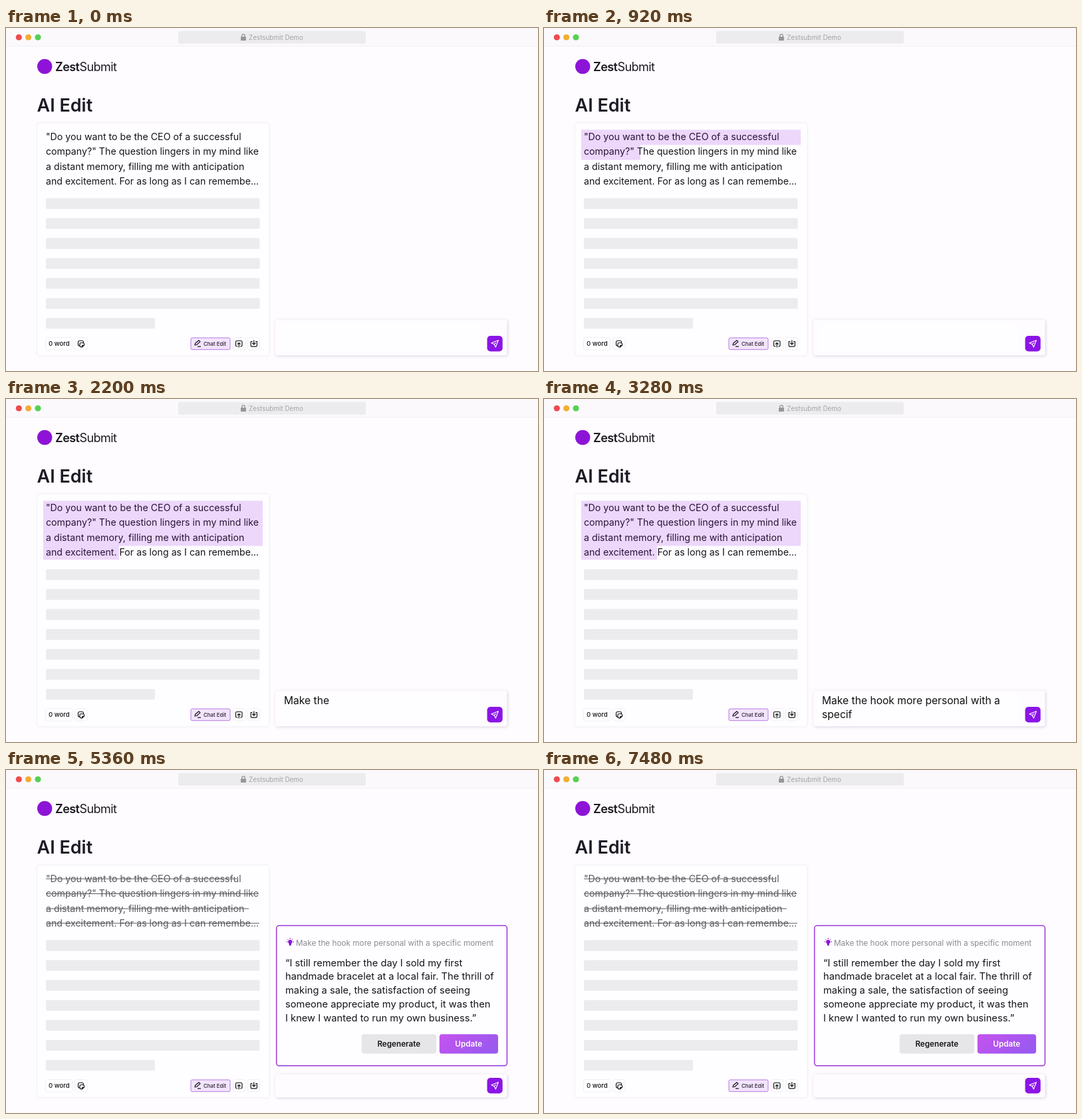
An HTML page that plays this animation: 800x517 px, repeating every 7.52 s.

```html
<!DOCTYPE html>
<html lang="en">
<head>
<meta charset="utf-8">
<title>AI Edit</title>
<style>
  html, body { margin: 0; width: 100%; height: 100%; overflow: hidden; background: #fefcff; }
  svg { display: block; width: 100vw; height: 100vh; font-family: Inter, "Open Sans", sans-serif; }
  :root { --loop: 7520ms; }

  .essay { font-size: 14.2px; fill: #161418; }
  .struck { fill: #5a585c; }
  .strike { stroke: #5a585c; stroke-width: 1; }
  .prompt { font-size: 15.6px; fill: #111; }
  .answer { font-size: 14.7px; fill: #161418; }
  .button { font-size: 11.7px; font-weight: 600; text-anchor: middle; }
  .pill { fill: #fff; stroke: #f1eef4; }
  .icon { fill: none; stroke: #161418; stroke-width: 1.2; stroke-linecap: round; stroke-linejoin: round; }
  .soft { filter: drop-shadow(0 0 1.5px rgba(70, 40, 100, .13)); }
  .raised { filter: drop-shadow(1px 1px 2px rgba(70, 40, 100, .2)); }

  .before { animation: leave var(--loop) linear infinite; }
  .after { opacity: 0; animation: enter var(--loop) linear infinite; }
  .sweep rect {
    fill: rgba(150, 20, 230, .16);
    transform: scaleX(0);
    transform-box: fill-box;
    transform-origin: left;
    animation: sweep var(--loop) linear infinite;
  }
  .sweep .last { animation-name: sweep-last; }
  .prompt .char { visibility: hidden; animation: type var(--loop) step-end infinite; }

  @keyframes leave { 0%, 51.6% { opacity: 1; } 54.8%, 100% { opacity: 0; } }
  @keyframes enter { 0%, 51.6% { opacity: 0; } 54.8%, 100% { opacity: 1; } }
  @keyframes sweep {
    0% { transform: scaleX(0); }
    4.39%, 50% { transform: scaleX(1); }
    50.01%, 100% { transform: scaleX(0); }
  }
  @keyframes sweep-last {
    0% { transform: scaleX(0); }
    1.52%, 50% { transform: scaleX(1); }
    50.01%, 100% { transform: scaleX(0); }
  }
  @keyframes type { 0% { visibility: visible; } 50%, 100% { visibility: hidden; } }
</style>
</head>
<body>
<svg viewBox="0 0 800 517" preserveAspectRatio="none">
  <defs>
    <linearGradient id="update" x1="0" y1="0" x2="1" y2=".4">
      <stop offset="0" stop-color="#c653ee"/>
      <stop offset="1" stop-color="#9b59ef"/>
    </linearGradient>
  </defs>
  <rect width="800" height="517" fill="#fefcff"/>

  <!-- window bar -->
  <rect width="800" height="27.5" fill="#fbf9fc"/>
  <path d="M0 27.5H800" stroke="#f3f0f5"/>
  <circle cx="19.3" cy="14" r="4.6" fill="#ee4b50"/>
  <circle cx="33.6" cy="14" r="4.6" fill="#f3ad35"/>
  <circle cx="48" cy="14" r="4.6" fill="#57d053"/>
  <rect x="259" y="4.5" width="282" height="19" rx="2.5" fill="#ecebee"/>
  <rect x="353" y="13" width="8" height="6" rx="1" fill="#98969b"/>
  <path d="M354.8 13V11.5a2.2 2.2 0 0 1 4.4 0V13" fill="none" stroke="#98969b" stroke-width="1.3"/>
  <text x="365" y="17.5" font-size="9.9" fill="#a5a3a8">Zestsubmit Demo</text>

  <!-- heading -->
  <circle cx="58.2" cy="58" r="11.2" fill="#8d14d6"/>
  <text x="74" y="65" font-size="18" letter-spacing="-.55" fill="#1b1920"><tspan font-weight="600">Zest</tspan><tspan>Submit</tspan></text>
  <text x="46.5" y="125.5" font-size="27" font-weight="600" fill="#1c1a24">AI Edit</text>

  <!-- essay card -->
  <rect class="soft" x="47" y="143.5" width="348.5" height="350" rx="4" fill="#fefdff"/>
  <g id="bars" fill="#ecebee"></g>
  <g class="before">
    <g id="essay" class="essay"></g>
    <g class="sweep">
      <rect x="56" y="153.3" width="330" height="22.9" style="animation-delay:502ms"/>
      <rect x="56" y="176.2" width="330" height="22.6" style="animation-delay:832ms"/>
      <rect x="56" y="198.8" width="330" height="22.6" style="animation-delay:1162ms"/>
      <rect class="last" x="56" y="221.4" width="114" height="20.8" style="animation-delay:1492ms"/>
    </g>
  </g>
  <g class="after">
    <g id="struck" class="essay struck"></g>
    <path class="strike" d="M60 164H347M60 186.5H380M60 209H365M60 231H381"/>
  </g>

  <!-- card tools -->
  <rect class="pill" x="59.5" y="466.5" width="40" height="18.5" rx="3"/>
  <text x="64" y="479.4" font-size="9.6" font-weight="500" fill="#161418">0 word</text>
  <rect class="pill" x="103.5" y="466.5" width="18.5" height="18.5" rx="3"/>
  <path class="icon" d="M110.5 471.5H114.5a2 2 0 0 1 2 2V474M110.5 471.5a2 2 0 0 0-2 2V477a2 2 0 0 0 2 2M113 474.5H115.5a2 2 0 0 1 2 2V478l-2.8 2.8H113a2 2 0 0 1-2-2V476.500a2 2 0 0 1 2-2ZM114.500 480.500V478.500H117.500"/>
  <rect x="278" y="467" width="59" height="17.7" rx="2" fill="#f3e4fd" stroke="#b57be0"/>
  <path class="icon" d="M284 478l.7-2.800 5.300-4.400 2 2.100-5.300 4.600ZM288.500 480.200H292.500"/>
  <text x="297" y="478.8" font-size="7.9" font-weight="500" fill="#2a2030">Chat Edit</text>
  <rect class="pill" x="341.500" y="466.500" width="18.500" height="18.500" rx="3"/>
  <path class="icon" d="M348 480H347a1.500 1.500 0 0 1-1.500-1.500V473a1.500 1.500 0 0 1 1.500-1.500H353.500a1.500 1.500 0 0 1 1.500 1.500V478.500a1.500 1.500 0 0 1-1.500 1.500H352.500M350.300 481V474.500M348.300 476.300l2-2 2 2"/>
  <rect class="pill" x="363.500" y="466.500" width="18" height="18.500" rx="3"/>
  <path class="icon" d="M370 472.500H368.200V478.500a1.700 1.700 0 0 0 1.700 1.700H375.700a1.700 1.700 0 0 0 1.700-1.700V472.500H375.600M372.800 470.800V477M370.600 475l2.200 2.200 2.200-2.200"/>

  <!-- prompt box, tall -->
  <g class="before">
    <rect class="raised" x="405" y="439.500" width="348.500" height="54" rx="4" fill="#fefcff"/>
    <rect x="412" y="444" width="303" height="45" fill="#fefdff"/>
    <g id="prompt" class="prompt"></g>
  </g>

  <!-- suggestion and short prompt box -->
  <g class="after">
    <rect class="raised" x="405" y="458.500" width="348.500" height="35" rx="4" fill="#fefcff"/>
    <rect x="406.700" y="234.500" width="346.700" height="211.300" rx="4" fill="#fefdff" stroke="#9b37da" stroke-width="1.500"/>
    <g fill="#8d14d6">
      <circle cx="427.300" cy="259" r="3.100"/>
      <rect x="425.800" y="261.200" width="3" height="3.600" rx="1"/>
      <path d="M427.300 253.300V254.500M422 259H423M431.600 259H432.600M423.500 255.200l.7.700M431.100 255.200l-.7.700" stroke="#8d14d6" stroke-linecap="round"/>
    </g>
    <text x="436" y="264.500" font-size="11.760" fill="#8c8a8f">Make the hook more personal with a specific moment</text>
    <g id="answer" class="answer"></g>
    <rect x="534.700" y="398.300" width="112.500" height="29.300" rx="4" fill="#e6e5e8"/>
    <text class="button" x="590.800" y="417" fill="#161418">Regenerate</text>
    <rect x="651.800" y="398.300" width="88.200" height="29.300" rx="4" fill="url(#update)"/>
    <text class="button" x="695.700" y="417" fill="#fff">Update</text>
  </g>

  <rect x="723.500" y="464" width="23.200" height="23.500" rx="5" fill="#8b14e6"/>
  <path d="M740.300 470.700L729.900 474.700l4.300 2.100 2.100 4.300ZM734.200 476.800l2.200-2.200" fill="none" stroke="#fff" stroke-width="1.200" stroke-linejoin="round" stroke-linecap="round"/>
</svg>
<script>
  const essay = [
    '"Do you want to be the CEO of a successful',
    'company?" The question lingers in my mind like',
    'a distant memory, filling me with anticipation',
    'and excitement. For as long as I can remembe...'
  ];
  const answer = [
    '“I still remember the day I sold my first',
    'handmade bracelet at a local fair. The thrill of',
    'making a sale, the satisfaction of seeing',
    'someone appreciate my product, it was then',
    'I knew I wanted to run my own business.”'
  ];
  const prompt = ['Make the hook more personal with a ', 'specific moment'];
  const typeStart = 1938, typeStep = 32.7;

  function add(parent, tag, attrs, text = '') {
    const el = document.createElementNS('http://www.w3.org/2000/svg', tag);
    for (const key in attrs) el.setAttribute(key, attrs[key]);
    el.textContent = text;
    return parent.appendChild(el);
  }

  function addLines(id, lines, x, y, step) {
    const group = document.getElementById(id);
    return lines.map((line, i) => add(group, 'text', { x, y: y + i * step }, line));
  }

  addLines('essay', essay, 60, 169, 22.3);
  addLines('struck', essay, 60, 169, 22.3);
  addLines('answer', answer, 420, 295.6, 20.85);

  const bars = document.getElementById('bars');
  for (let i = 0; i < 7; i++) {
    add(bars, 'rect', { x: 60, y: 256.4 + i * 30.1, width: i < 6 ? 321.5 : 164, height: 16.3, rx: 2 });
  }

  // each character appears in turn
  let typed = 0;
  addLines('prompt', ['', ''], 418, 460.3, 21).forEach((row, i) => {
    for (const char of prompt[i]) {
      typed++;
      const delay = typeStart + typed * typeStep;
      add(row, 'tspan', { class: 'char', style: `animation-delay:${delay}ms` }, char);
    }
  });
</script>
</body>
</html>
```
